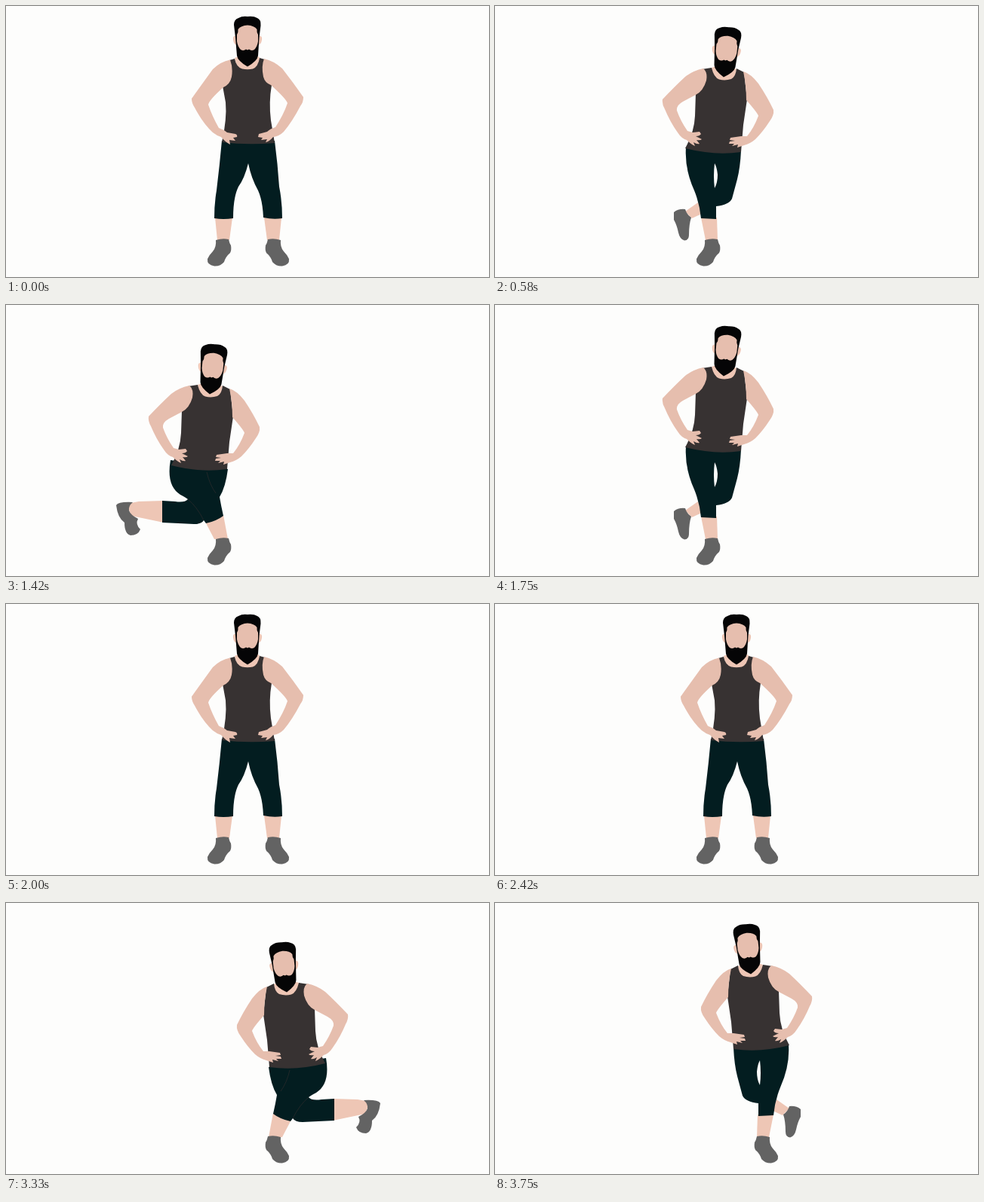
Animation, 640 px wide and 360 px high, one loop 3830 ms. Source, as an HTML page:

```html
<!DOCTYPE html>
<html lang="en">
<head>
<meta charset="utf-8">
<title>Curtsy lunge</title>
<style>
  html, body { margin: 0; width: 100%; height: 100%; overflow: hidden; background: #fdfdfc; }
  svg { display: block; width: 640px; height: 360px; }
  .skin { fill: #e6beae; }
  .warm { fill: #eec6b5; }
  .top { fill: #373232; }
  .shorts { fill: #031d20; }
  .shoe { fill: #636363; }
  .hair { fill: #050506; }
  .seam { fill: none; stroke: #292a2b; stroke-width: .8; }
</style>
</head>
<body>
<svg id="stage" viewBox="0 0 640 360"></svg>
<script>
const LOOP = 3830;
const FRAME = 1000 / 12;
const MIRROR = 'matrix(-1 0 0 1 642 0)';

const path = (cls, d) => `<path class="${cls}" d="${d}"/>`;
const group = (transform, inner) => `<g transform="${transform}">${inner}</g>`;

const head =
  path('warm', 'M306 40Q300 39 301 45Q302 52 307 52ZM334 40Q340 39 339 45Q338 52 333 52Z') +
  path('hair', 'M304 42L302 25Q302 18 308 16Q313 13 320 14Q328 13 333 16Q338 18 337.5 26L335.5 42L334 66Q333 73 320 80.5Q307 73 306 66Z') +
  path('skin', 'M306 47L306 38Q308 35 307.5 31Q311 26 320 25.5Q329 26 332.5 31Q332 35 334 38L334 47Q333 54 329 58Q325 60 322 57.5L320 58.5L318 57.5Q315 60 311 58Q307 54 306 47Z');

const frontShoe = path('shoe', 'M278 311Q287 308 295 310Q296 315 298 318Q299 324 297 328Q291 333 289 340Q284 346 276 345.5Q266 344 267 336Q269 331 274 326Q279 320 278 311Z');

const standTorso =
  path('warm', 'M303 69Q305 83 313 84.5Q320 86 327 84.5Q335 82 336 68L320 62Z') +
  path('top', 'M296 72L303 70Q305 81 313 83.5Q320 85 327 83.5Q334 81 336 69L343 71L352 105Q348 128 351 152L356 182Q320 185 286 181Q293 150 291 128L287 106Z') +
  path('skin', 'M297 71.5Q284 74 274 84Q261 102 246 123Q246 129 250 135Q261 156 274 168Q279 172 285 174Q291 181 297 184L296 178L304 179L301 175L306 174Q307 171 304 170L293 168Q288 164 282 162Q273 146 268 131Q269 125 288 108Q297 104 299 94Q301 82 297 71.5Z') +
  path('skin', 'M342 70Q355 73 366 83Q380 101 394 121Q394 128 390 133Q379 154 368 167Q362 173 354 174Q349 180 344 181L346 177L338 178L340 175L334 174L335 170L346 167Q350 163 357 161Q368 144 373 129Q371 123 351 105Q343 102 341 94Q338 80 342 70Z');

const tiltTorso =
  path('warm', 'M287 82Q289 97 297 99Q305 100.5 313 98Q319 95 320 84L304 76Z') +
  path('top', 'M274 84L287 82Q290 95 297 97.5Q305 99.5 313 97Q319 94 320 83L330 88L334 124L329 158L326 194Q290 199 252 189Q264 168 265 146L266 116Z') +
  path('skin', 'M276 83Q262 86 252 94Q238 107 222 124Q221 130 225 137Q232 154 242 168Q247 176 254 178Q260 184 265 186L263 181Q268 184 271 183L267 178Q272 179 274 177L266 173Q271 173 273 170L271 167L262 168L255 166Q246 153 241 139Q240 132 249 127L266 118Q276 113 280 99Q282 88 276 83Z') +
  path('skin', 'M329 87Q339 90 349 103Q361 121 369 138Q370 145 364 153Q355 167 345 177Q338 183 330 185L321 188L322 184L314 186L317 183L310 183L311 180L318 179L311 178L312 175L326 173L334 173Q343 162 349 146Q348 142 333 125Q333 105 329 87Z');

const tiltUpper = tiltTorso + group('translate(-17 14) rotate(6 320 80)', head);

const standLeg = path('warm', 'M277 281L280 311L296 311L300 281Z') + frontShoe;

const stand =
  standLeg + group(MIRROR, standLeg) +
  path('shorts', 'M286 179L356 179Q360 210 362 240Q366 260 366 282Q354 284 341 281Q340 258 334 245Q325 229 321 209Q316 229 308 240Q301 254 301 282Q288 284 276 282Q276 262 279 245Q283 212 286 179Z') +
  standTorso + head;

const cross =
  path('warm', 'M269 261L252 273L261 282L274 276Z') +
  path('shoe', 'M237 274Q243 269 252 270Q254 277 260 281Q257 290 257 304Q257 311 251 311.5Q245 310 243 301Q241 291 237 284Z') +
  path('warm', 'M273 281L279 311L295 311L294 281Z') + frontShoe +
  path('shorts', 'M253 188Q290 198 326 192Q325 214 321 230Q317 245 314 256Q310 264 293 266L293 283L273 282Q271 262 264 245Q251 216 253 188ZM291 209Q289 226 291 242Q295 235 295 224Q294 214 291 209Z') +
  tiltUpper;

const lunge =
  path('warm', 'M209 260L176 261L160 264L166 280L209 289Z') +
  path('shoe', 'M146 266Q149 261 168 262Q162 267 163 273Q165 279 175 284Q171 291 178 298Q175 306 165 306Q157 304 157 289Q148 283 146 266Z') +
  path('warm', 'M264 288L276 311L294 311L288 279Z') + frontShoe +
  path('shorts', 'M218 206L294 218Q291 242 283 255Q285 267 288 280Q279 287 265 290L262 286Q259 291 249 291L207 289L207 260L224 261Q237 263 241 258Q237 255 231 252Q212 240 218 206Z') +
  path('seam', 'M266 222Q270 239 278 250M241 258Q253 268 262 286') +
  group('translate(-33 24)', tiltUpper);

const poses = { stand, cross, lunge, crossBack: group(MIRROR, cross), lungeBack: group(MIRROR, lunge) };

// Start of each pose, in twelfths of a second.
const steps = [
  [0, 'stand'], [7, 'cross'], [12, 'lunge'], [18, 'cross'],
  [24, 'stand'], [30, 'crossBack'], [35, 'lungeBack'], [41, 'crossBack']
];

const stage = document.getElementById('stage');
stage.innerHTML = Object.entries(poses)
  .map(([name, body]) => `<g id="${name}" display="none">${body}</g>`).join('');

let shown = null;
function draw() {
  // Pose times are rounded to 10 ms, so allow half of that.
  const beat = (performance.now() % LOOP + 5) / FRAME;
  const name = steps.filter(([start]) => start <= beat).pop()[1];
  const next = document.getElementById(name);
  if (next !== shown) {
    if (shown) shown.setAttribute('display', 'none');
    next.removeAttribute('display');
    shown = next;
  }
  requestAnimationFrame(draw);
}
draw();
</script>
</body>
</html>
```
